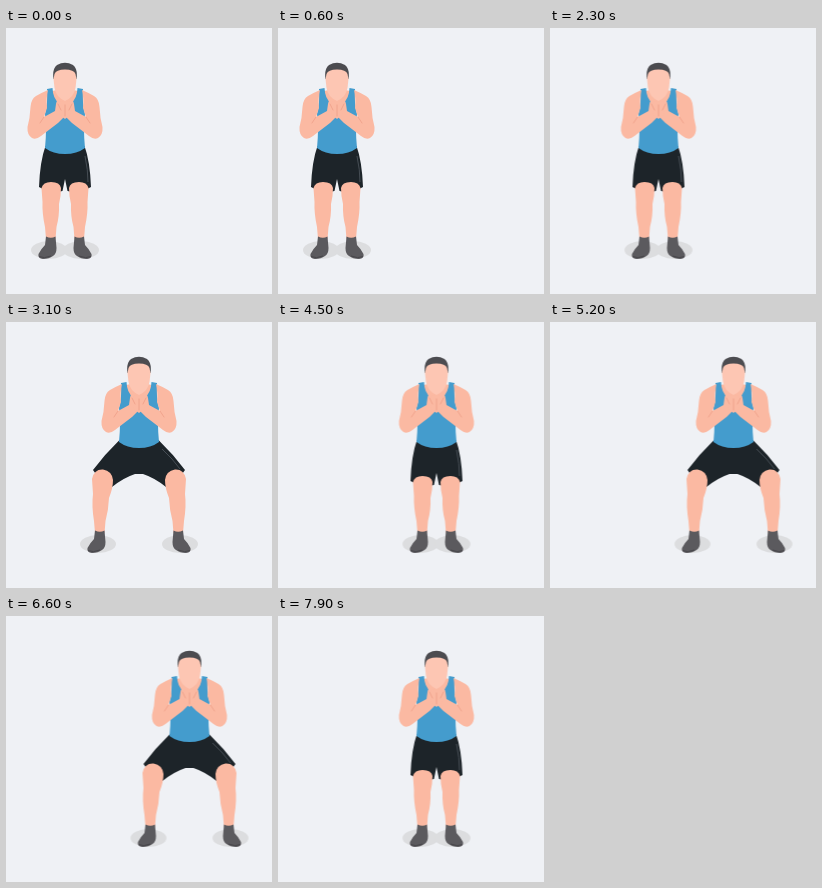
An HTML page that plays this animation: 266 px wide and 266 px high, repeating every 8 s.

```html
<!DOCTYPE html>
<html lang="en">
<head>
<meta charset="utf-8">
<title>Side squat steps</title>
<style>
  html, body { margin: 0; width: 100%; height: 100%; overflow: hidden; background: #eff1f5; }
  svg { display: block; width: 100vw; height: 100vh; }
  .skin { fill: #fbb9a2; }
  .face { fill: #fdc6b3; }
  .fold { fill: none; stroke: #ee9f88; stroke-width: .8; stroke-linecap: round; }
  .hair { fill: #4c4c50; }
  .top { fill: #449ccd; }
  .shorts { fill: #1d2429; }
  .seam { fill: none; stroke: #515960; stroke-width: .8; }
  .shoe { fill: #5b5a5e; }
  .sole { fill: none; stroke: #47464a; stroke-width: 1; }
  .shadow { fill: #dcdddf; }

  .figure { animation: travel 8s step-end infinite; }
  .stand { animation: stand 8s step-end infinite; }
  .squat { animation: squat 8s step-end infinite; }

  /* Each beat jumps half a step sideways. */
  @keyframes travel {
    0% { transform: translate(59px, 0); }
    10% { transform: translate(83.5px, 0); }
    20% { transform: translate(108.5px, 0); }
    30% { transform: translate(133px, 0); }
    41.25% { transform: translate(158.5px, 0); }
    61.25% { transform: translate(183.5px, 0); }
    71.25% { transform: translate(208.5px, 0); }
    81.25% { transform: translate(183.5px, 0); }
    92.5%, 100% { transform: translate(158.5px, 0); }
  }
  @keyframes stand {
    0%, 20%, 41.25%, 71.25%, 92.5%, 100% { visibility: visible; }
    10%, 30%, 61.25%, 81.25% { visibility: hidden; }
  }
  @keyframes squat {
    0%, 20%, 41.25%, 71.25%, 92.5%, 100% { visibility: hidden; }
    10%, 30%, 61.25%, 81.25% { visibility: visible; }
  }
</style>
</head>
<body>
<svg viewBox="0 0 266 266" role="img" aria-label="Man stepping sideways into squats">
  <defs>
    <g id="shoe">
      <path class="shoe" d="M-19 208.500Q-14 211-9.500 208.500L-8.500 220Q-8.500 226-12 228Q-16 231-22 231Q-27.500 230.500-26.500 226Q-24 221-20 217Z"/>
      <path class="sole" d="M-26 228.500Q-21 231-14 228"/>
    </g>
    <g id="standLeg">
      <path class="skin" d="M-23.500 160Q-22 154-14 154Q-5 154-4 160Q-4 168-6 176Q-5.500 188-8.500 199L-9.500 211H-19L-20 199Q-23 185-22.500 174Z"/>
      <use href="#shoe"/>
    </g>
    <g id="squatLeg">
      <path class="skin" d="M-47 157Q-45 147-36 147.500Q-27 149-26 158Q-26 166-30 176Q-30.500 188-33.500 199L-34.500 211H-44L-45 199Q-47.500 184-46 172Z"/>
      <use href="#shoe" x="-25"/>
    </g>
    <g id="arm">
      <path class="skin" d="M-17 62Q-24 65-29 68Q-34 71-34.500 79Q-35 90-37.500 99Q-38 107-33 110Q-29 112-24 108L-7 95L0 88L-2 78L-5 72Q-8 71-9 76L-10 83L-21 89L-18 80Q-19 70-17 62Z"/>
      <path class="fold" d="M-21 89L-25 95"/>
    </g>
  </defs>

  <g class="figure">
    <g class="stand">
      <ellipse class="shadow" cx="-16" cy="222" rx="18" ry="9"/>
      <ellipse class="shadow" cx="16" cy="222" rx="18" ry="9"/>
      <path class="shorts" d="M-19.500 118H19.500Q25 133 26 159Q14 166 2.500 163L0 151L-2.500 163Q-14 166-26 159Q-25 133-19.500 118Z"/>
      <path class="seam" d="M20 128Q23 142 23 154"/>
      <use href="#standLeg"/>
      <use href="#standLeg" transform="scale(-1 1)"/>
    </g>

    <g class="squat">
      <ellipse class="shadow" cx="-41" cy="222" rx="18" ry="9"/>
      <ellipse class="shadow" cx="41" cy="222" rx="18" ry="9"/>
      <path class="shorts" d="M-19.500 118H19.500Q34 132 46 148Q40 158 27 165Q16 156 4 152H-4Q-16 156-27 165Q-40 158-46 148Q-34 132-19.500 118Z"/>
      <path class="seam" d="M23 127Q34 137 41 147"/>
      <use href="#squatLeg"/>
      <use href="#squatLeg" transform="scale(-1 1)"/>
    </g>

    <path class="skin" d="M-8 57H8V62L18 64V88H-18V64L-8 62Z"/>
    <path class="top" d="M-18 61L-12.500 60Q-12 71-6 75Q0 78 6 75Q12 71 12.500 60L18 61Q17 75 20 86Q18 100 20 120Q12 126 0 126Q-12 126-20 120Q-18 100-20 86Q-17 75-18 61Z"/>
    <use href="#arm"/>
    <use href="#arm" transform="scale(-1 1)"/>
    <path class="skin" d="M-6 75Q0 70 6 75L5 87L0 91L-5 87Z"/>
    <path class="fold" d="M0 77V88M-7 76L-4 82M7 76L4 82"/>

    <path class="hair" d="M-11.500 51Q-13 41-8 37Q0 32.500 8 37Q13 41 11.500 51Z"/>
    <path class="face" d="M-10.500 46Q-9 41.500 0 41.500Q9 41.500 10.500 46L11.500 51L10.500 60Q9 69 0 73Q-9 69-10.500 60L-11.500 51Z"/>
  </g>
</svg>
</body>
</html>
```
